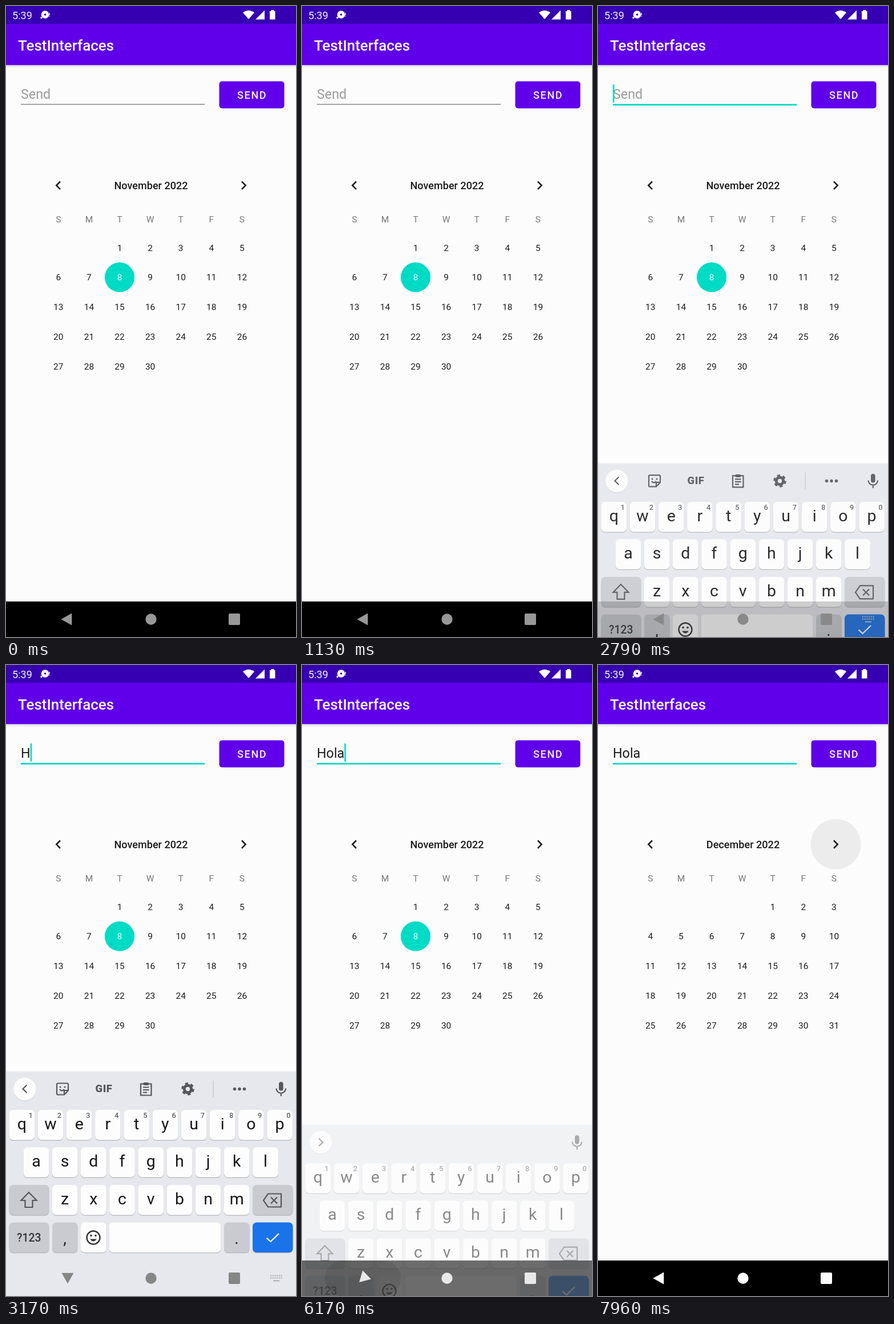
An HTML page that plays this animation: 508x1102 px, repeating every 8 s.

```html
<!DOCTYPE html>
<html lang="en">
<head>
<meta charset="utf-8">
<title>TestInterfaces</title>
<style>
html, body { margin: 0; width: 100%; height: 100%; overflow: hidden; background: #fcfcfc; }
svg { display: block; width: 100%; height: 100%; }
text { font-family: Roboto, "Open Sans", sans-serif; white-space: pre; }
.mid { text-anchor: middle; }
.bold { font-weight: 500; }
.line { fill: none; stroke: #55575b; stroke-width: 2.2; }
</style>
</head>
<body>
<svg id="stage" viewBox="0 0 508 1102"></svg>
<script>
const stage = document.getElementById('stage');
const PURPLE = '#6000eb', TEAL = '#00dbc5', GREY = '#c9cbd0', INK = '#55575b';

const rect = (x, y, w, h, fill, rest = '') =>
  `<rect x="${x}" y="${y}" width="${w}" height="${h}" fill="${fill}" ${rest}/>`;
const circle = (x, y, r, fill, rest = '') =>
  `<circle cx="${x}" cy="${y}" r="${r}" fill="${fill}" ${rest}/>`;
const path = (d, rest) => `<path d="${d}" ${rest}/>`;
const line = (d, rest = '') => path(d, `class="line" ${rest}`);
const text = (s, x, y, size, fill, cls = '', rest = '') =>
  `<text x="${x}" y="${y}" font-size="${size}" fill="${fill}" class="${cls}" ${rest}>${s}</text>`;

function statusBar() {
  return rect(0, 0, 508, 31, '#3600b2') + rect(0, 31, 508, 72.5, PURPLE) +
    rect(0, 103.5, 508, 5, 'url(#shade)') +
    text('5:39', 11, 22.5, 18.1, '#f4f0ff') +
    circle(68.5, 15, 6.8, '#fff') + circle(68.5, 15, 1.8, '#3600b2') +
    circle(62, 20.5, 1.7, '#fff') + rect(75.6, 12, 1.3, 4, '#fff') + rect(75.6, 17, 1.3, 1.4, '#fff') +
    path('M425 23 415 11.5Q425 4 435 11.5ZM453 7.5V23.5H437ZM464.5 7h5v2h2v14.5h-9.5V9h2.5Z', 'fill="#fff"') +
    text('TestInterfaces', 21, 77.7, 25.9, '#fbf8ff', 'bold');
}

function month(title, first, days, selected) {
  const colX = i => 91.8 + 53.6 * i;
  let out = text(title, 254, 319.5, 18.1, '#1c1c1c', 'mid bold');
  [...'SMTWTFS'].forEach((d, i) => out += text(d, colX(i), 377.7, 15.5, '#777', 'mid'));
  for (let d = 1; d <= days; d++) {
    const cell = d + first - 1, x = colX(cell % 7), y = 422 + 51.8 * Math.floor(cell / 7);
    if (d === selected) out += circle(x, y, 26, TEAL);
    out += text(d, x, y + 5.5, 15.5, d === selected ? '#e8fffc' : '#1c1c1c', 'mid');
  }
  return out;
}

const key = (x, y, w, fill = '#fdfdfd') =>
  rect(x, y + 1.3, w, 52.5, '#b4b7bc', 'rx="7"') + rect(x, y, w, 52.5, fill, 'rx="7"');

function keyboard() {
  const rows = [['qwertyuiop', 5.5, 777], ['asdfghjkl', 30.6, 842.3], ['zxcvbnm', 80.8, 908]];
  let out = rect(0, 709, 508, 2.5, '#f1f2f4') + rect(0, 711, 508, 391, '#e6e8ed');
  rows.forEach(([letters, left, y], r) => [...letters].forEach((c, i) => {
    const x = left + 50.2 * i;
    out += key(x, y, 44.6) + text(c, x + 22.3, y + 34, 28.5, '#161616', 'mid');
    if (!r) out += text((i + 1) % 10, x + 37.7, y + 14, 13, '#5f6368', 'mid bold');
  }));
  out += key(5.5, 908, 70, GREY) + key(432, 908, 70.5, GREY) +
    line('M40 921 53.5 935H46.5V947H33.5V935H26.5Z', 'stroke-width="2.6" stroke="#444"') +
    line('M459 923.5H482V946.5H459L451 935ZM464 929.5 475 940.5M475 929.5 464 940.5') +
    key(5.5, 973.5, 70, GREY) + text('?123', 40.3, 1007, 19.4, '#33353a', 'mid bold') +
    key(81, 973.5, 44.6, GREY) + text(',', 103, 1011, 28.5, '#222', 'mid') +
    key(131, 973.5, 44.6) + circle(153, 1000, 11.5, 'none', 'stroke="#333" stroke-width="2.4"') +
    circle(149, 996.5, 1.8, '#333') + circle(157, 996.5, 1.8, '#333') +
    path('M147 1002.5Q153 1010.500 159 1002.5Z', 'fill="#333"') +
    key(180.7, 973.5, 195.6) +
    key(382, 973.5, 44.6, GREY) + text('.', 404, 1011, 28.5, '#222', 'mid') +
    key(432, 973.5, 70.5, '#1a73e8') +
    path('M456.500 1000.5 463.500 1007 478 993', 'fill="none" stroke="#fff" stroke-width="2.3"');

  const mic = rect(478, 728, 7.6, 15.5, INK, 'rx="3.8"') + line('M473.5 739.500A8.2 8.2 0 0 0 490 739.500M481.8 747.500V753');
  return out + circle(33, 741.5, 20, '#d3d5da') + circle(33, 740.5, 19.8, '#fdfdfd') +
    line('M36.500 733.5 29.500 740.3 36.500 747', 'id="chevron"') + mic +
    `<g id="tools">${tools()}</g><g id="suggest">` +
    rect(179, 725, 1.3, 31, '#c3c5ca') + rect(326, 725, 1.3, 31, '#c3c5ca') +
    [114, 253, 391.5].map(x => text('', x, 749.7, 23.5, '#4a4c50', 'mid word')).join('') + '</g>';
}

function tools() {
  return line('M91 730.500H107Q109 730.500 109 732.500V743L102 750.500H91Q89 750.500 89 748.500V732.500Q89 730.500 91 730.500ZM109 743H102V750M94 741Q98 746 102 741') +
    circle(95, 737, 1.5, INK) + circle(103, 737, 1.5, INK) +
    text('GIF', 171.5, 746.3, 18.5, INK, 'mid', 'font-weight="900" letter-spacing=".6"') +
    line('M236 731.500H254.500V751.500H236ZM240 737.500H250.500M240 742H250.500M240 746.500H247') +
    rect(240.500, 729, 9.500, 5, INK, 'rx="1.5"') +
    circle(318.5, 740.5, 6.2, 'none', `stroke="${INK}" stroke-width="5"`) +
    circle(318.5, 740.5, 9.5, 'none', `stroke="${INK}" stroke-width="3.6" stroke-dasharray="5.2 4.75"`) +
    rect(362.5, 726, 1.3, 29, '#c3c5ca') +
    [400.5, 409, 417.5].map(x => circle(x, 740.5, 2.7, INK)).join('');
}

function navBar() {
  let dots = rect(468, 1074.5, 11, 1.8, '#a4a6a9');
  for (let i = 0; i < 12; i++) dots += rect(463 + i % 6 * 3.7, 1065.5 + 4 * Math.floor(i / 6), 2, 2, '#a4a6a9');
  return rect(0, 1040, 508, 62, '#000', 'id="navBack"') +
    rect(40, 1040, 133, 62, '#000', 'rx="31" id="backRipple"') +
    '<g id="navIcons">' + path('M96.500 1071 115.300 1060.500V1081.500Z', 'id="back" stroke-linejoin="round"') +
    '<circle cx="254" cy="1071" r="9.7"/><rect x="390" y="1061" width="20" height="20" rx="2"/></g>' +
    `<g id="imeSwitch">${dots}</g>`;
}

stage.innerHTML = `<defs>
  <linearGradient id="shade" x2="0" y2="1"><stop stop-color="#dedee0"/><stop offset="1" stop-color="#fcfcfc"/></linearGradient>
  <clipPath id="pager">${rect(65, 250, 376, 420, '#000')}</clipPath></defs>` +
  rect(0, 0, 508, 1102, '#fcfcfc') + statusBar() +
  text('Send', 26, 162.3, 23.3, '#9b9b9b', '', 'id="hint"') +
  text('', 26, 162.3, 23.3, '#1c1c1c', '', 'id="typed"') +
  rect(26, 163.8, 0, 1.3, '#1c1c1c', 'id="composing"') +
  rect(26, 171, 322, 1.3, '#777', 'id="underline"') +
  rect(26, 137, 2.6, 31.5, TEAL, 'id="caret"') +
  rect(373.5, 131.5, 114, 47.3, PURPLE, 'rx="5"') +
  text('SEND', 405, 162, 18.1, '#f6f0ff', 'bold', 'letter-spacing="1.62"') +
  circle(416.5, 313, 44, '#ececec', 'id="ripple"') +
  `<g clip-path="url(#pager)"><g id="months">${month('November 2022', 2, 30, 8)}
  <g transform="translate(376)">${month('December 2022', 4, 31)}</g></g></g>` +
  path('M95 306.500 88.300 313.300 95 320M413 306.500 419.700 313.300 413 320', 'fill="none" stroke="#1c1c1c" stroke-width="2.6"') +
  `<g id="keyboard">${keyboard()}</g>` + navBar();

const el = {};
stage.querySelectorAll('[id]').forEach(n => el[n.id] = n);
const words = [...stage.querySelectorAll('.word')];
const set = (id, attrs) => { for (const a in attrs) el[id].setAttribute(a, attrs[a]); };
const show = (id, on) => set(id, { visibility: on ? 'visible' : 'hidden' });

const ramp = (t, from, to) => Math.min(1, Math.max(0, (t - from) / (to - from)));
const easeOut = p => 1 - (1 - p) ** 3;
const smooth = p => p * p * (3 - 2 * p);

const FOCUS = 2420, BACK = 5980, KEYS = [3130, 3600, 4040, 4480];
const GUESSES = ['H He How', 'Ho How Home', 'Hol Hold Holiday', 'Hola Holandric Holarctic'];

function draw(t) {
  const count = KEYS.filter(k => t >= k).length;
  const focused = t >= FOCUS, leaving = t >= BACK;

  // text field
  el.typed.textContent = 'Hola'.slice(0, count);
  const width = count ? el.typed.getComputedTextLength() : 0;
  const blinkFrom = leaving ? BACK : count ? KEYS[count - 1] : FOCUS;
  show('hint', !count);
  show('caret', focused && Math.floor((t - blinkFrom) / 500) % 2 === 0);
  set('caret', { x: 26 + width });
  set('composing', { width: t >= 3210 && !leaving ? width : 0 });
  set('underline', { height: focused ? 2.8 : 1.3, fill: focused ? TEAL : '#777' });

  // keyboard
  const alpha = leaving ? 1 - ramp(t, 6070, 6270) : easeOut(ramp(t, 2660, 2900));
  const drop = leaving ? easeOut(ramp(t, 6000, 6280)) : 1 - easeOut(ramp(t, 2784, 2984));
  show('keyboard', alpha > 0);
  set('keyboard', { opacity: alpha, transform: `translate(0 ${99 * drop})` });
  const suggesting = t >= 3210;
  show('tools', alpha > 0 && !suggesting);
  show('suggest', alpha > 0 && suggesting && !leaving);
  set('chevron', { transform: suggesting ? 'rotate(180 33 740.3)' : '' });
  if (count) GUESSES[count - 1].split(' ').forEach((w, i) => words[i].textContent = w);

  // navigation bar
  const light = leaving ? 1 - smooth(ramp(t, 6062, 6262)) : smooth(ramp(t, 2650, 2845));
  const turn = leaving ? 1 - smooth(ramp(t, 6070, 6270)) : smooth(ramp(t, 2800, 3000));
  const tone = leaving ? 255 - 121 * light ** 2 : 152 - 18 * light;
  set('navBack', { opacity: 1 - light });
  set('navIcons', { fill: `rgb(${tone},${tone},${tone})` });
  set('back', { transform: `rotate(${-90 * turn} 107 1070)` });
  set('backRipple', { opacity: leaving ? 0.1 * (1 - ramp(t, 6150, 6400)) : 0 });
  show('imeSwitch', t >= 2700 && t < 6070);

  // month change
  const press = ramp(t, 7250, 7475);
  set('ripple', { r: 44 * easeOut(press), opacity: ramp(t, 7250, 7330) });
  const slide = 1 - (1 - ramp(t, 7480, 7780)) ** 5;
  set('months', { transform: `translate(${-376 * slide})` });
}

function tick() {
  draw(performance.now() % 8000);
  requestAnimationFrame(tick);
}
tick();
</script>
</body>
</html>
```
